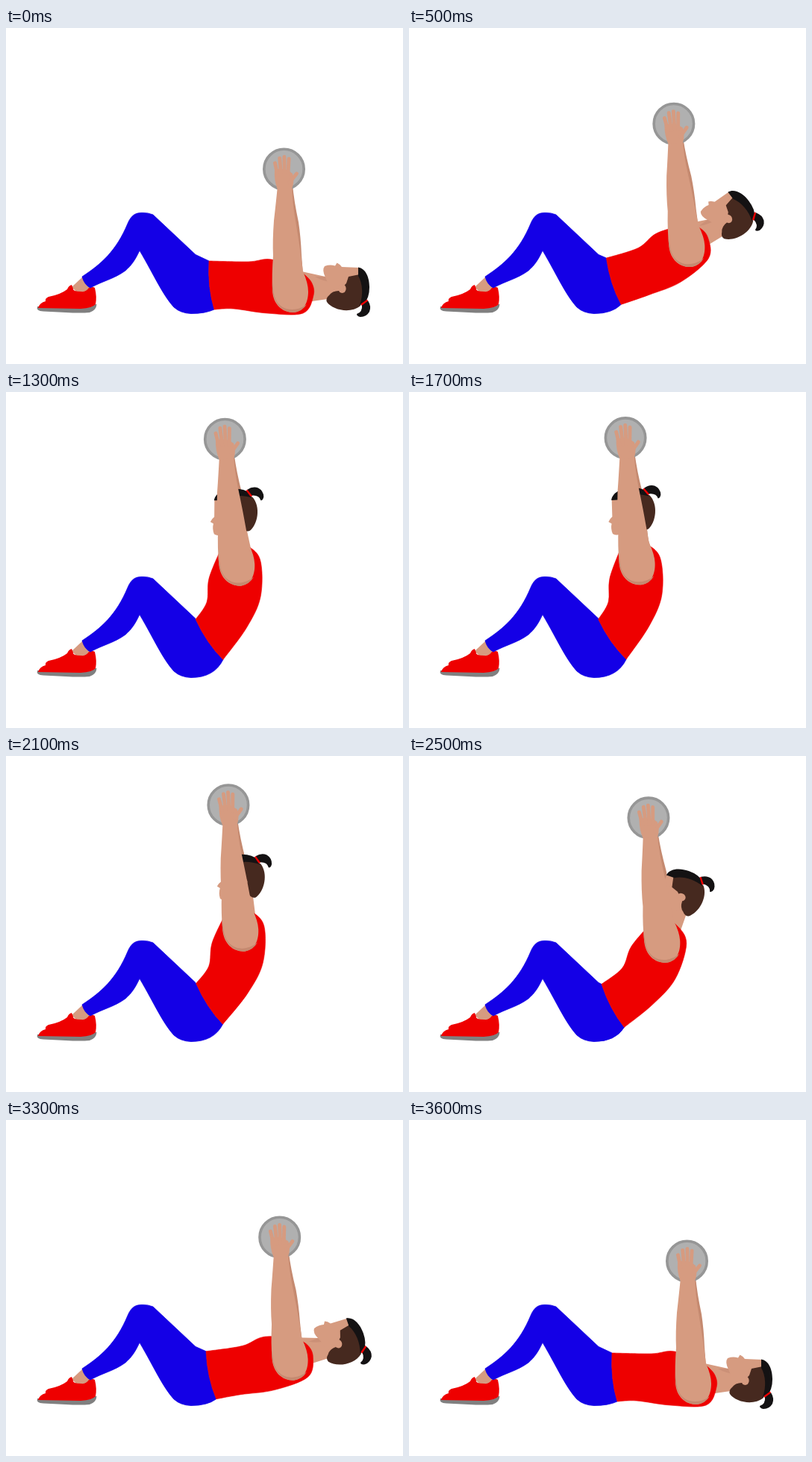
An HTML page with a canvas that plays this animation: 532 by 450 pixels, repeating every 3700 ms.

```html
<!DOCTYPE html>
<html lang="en">
<head>
<meta charset="utf-8">
<title>Weighted sit-up</title>
<style>
  html, body { margin: 0; width: 100%; height: 100%; overflow: hidden; background: #fff; }
  canvas { display: block; }
</style>
</head>
<body>
<canvas id="stage" width="532" height="450"></canvas>
<script>
const ctx = document.getElementById('stage').getContext('2d');
const LOOP = 3700, STEP = 100, TOP = 1700, FULL = 76;
const SKIN = '#d69b80', SHADE = '#c58a70', JAW = '#cb9077', RED = '#ee0000', BLUE = '#1400e6';
const HAIR = '#46291f', BLACK = '#141213';

// Joints of the lying pose; everything else turns around them
const HIP = [268, 340], NECK_ROOT = [268, 344], WAIST = [275.5, 344.5];
const SHOULDER = [382, 355], EAR = [451, 349], REACH = [-9.5, -166];

const shapes = {
  leg: 'M225 374C209 356 199 332 179 298C173 311 168 318 160 325C145 336 129 339 113 348' +
       'Q105 344 102 333C128 316 148 298 163 262C168 250 174 247.5 182 247.5Q190 247 197 250L254 303.5',
  ankle: 'M103 333L88 347L98 357L114 354L114 347Z',
  sole: 'M42 373Q40 379 50 379.5L80 381Q100 382 112 381Q121 378 121.5 370L112 370Z',
  shoe: 'M88 344Q84 345 82 350Q73 357 57 360Q52 362 53 366Q45 368 43 375L100 376Q116 375 120 370' +
        'Q122 360 119 348Q117 346 111 348Q107 354 101 353Q89 353 90 349Z',
  farArm: 'M370 208L384 210Q386 232 392 260Q395 280 396 304L398 330L376 330Z',
  arm: 'M364 211Q362 232 359 258Q357 285 358 305Q356 330 357 352C358 370 370 381 385 381' +
       'C398 380 405 369 405 353Q405 342 398 326Q396 310 392 283L387 252Q384 235 383 210Z',
  armShade: 'M357 340C355 367 370 381 385 381Q397 380 403 370C388 382 361 380 358.5 352Z',
  palm: 'M360 190Q359 204 363.5 215L383 215Q387 207 384 195Q373 186 360 190Z',
  face: 'M474 321L450 320Q447 316 443.5 314.5L441 318.5Q434 316.5 427 319Q423 324 428 334' +
        'Q434 345 431 362L455 371L476 345Z',
  jawShade: 'M429 333L414 333Q424 339 436 340Z',
  hair: 'M474 330L459 333L456 342L446 352Q437 352 433 358Q428 362 430 367' +
        'C438 378 462 383 475 372L480 350Z',
  cap: 'M472 320.5C482 322 487 334 487 347Q487 361 480 369L474 371C479 358 478 342 472 332Z',
  tail: 'M477 370L485 365Q490 373 487 380Q483 387 475 387Q470 386 470 383Q478 381 477 370Z',
  tie: 'M475.5 369.5L484 363.5L485 365.5L476.5 372Z'
};
for (const key in shapes) shapes[key] = new Path2D(shapes[key]);

const rad = deg => deg * Math.PI / 180;
const add = (a, b) => [a[0] + b[0], a[1] + b[1]];
const sub = (a, b) => [a[0] - b[0], a[1] - b[1]];

// Turn a point counter-clockwise around a centre
function spin(point, centre, deg) {
  const [x, y] = sub(point, centre), c = Math.cos(rad(deg)), s = Math.sin(rad(deg));
  return add(centre, [x * c + y * s, y * c - x * s]);
}

// Steady speed that levels off at a limit; a larger n gives a sharper bend
const level = (v, limit, n) => v / Math.pow(1 + Math.pow(v / limit, n), 1 / n);

function liftAt(t) {
  return t < TOP ? level(0.062 * t, 79, 14) : level(0.0538 * Math.max(0, 3600 - t), 79, 8);
}

function poseAt(lift) {
  const k = lift / FULL;
  const bulge = 14 * Math.sin(Math.PI / 2 * Math.min(1, k));
  // The spine bows backwards between hip and shoulders
  const chest = (x, y) => {
    const u = Math.min(1, (x - HIP[0]) / 130);
    return spin([x, y + bulge * Math.sin(Math.PI * u)], HIP, lift);
  };
  const waist = (x, y) => add(spin([x, y], WAIST, 0.37 * lift), [-3 * k, -13 * k]);
  const shoulder = spin(SHOULDER, HIP, lift);
  const armTurn = 2.5 * k + 2.2 * Math.sin(Math.PI * k);
  const stretch = 1 + 0.027 * k * k;
  return {
    chest, waist, shoulder, armTurn, stretch,
    plate: add(shoulder, spin([REACH[0], REACH[1] * stretch], [0, 0], armTurn)),
    ear: spin(EAR, NECK_ROOT, lift * (0.95 + 0.09 * k)),
    headTurn: 1.21 * lift
  };
}

function fill(path, color) {
  ctx.fillStyle = color;
  ctx.fill(path);
}

function outline(path, color, width) {
  ctx.strokeStyle = color;
  ctx.lineWidth = width;
  ctx.stroke(path);
}

// Smooth curve through points, starting from the current one
function curve(path, pts) {
  for (let i = 0; i < pts.length - 1; i++) {
    const b = pts[i], c = pts[i + 1];
    const a = pts[i - 1] || b, d = pts[i + 2] || c;
    path.bezierCurveTo(
      b[0] + (c[0] - a[0]) / 6, b[1] + (c[1] - a[1]) / 6,
      c[0] - (d[0] - b[0]) / 6, c[1] - (d[1] - b[1]) / 6, c[0], c[1]);
  }
}

function placed(at, from, deg, stretch, draw) {
  ctx.save();
  ctx.translate(...at);
  ctx.rotate(-rad(deg));
  ctx.scale(1, stretch);
  ctx.translate(-from[0], -from[1]);
  draw();
  ctx.restore();
}

const inArm = (p, draw) => placed(p.shoulder, SHOULDER, p.armTurn, p.stretch, draw);

function drawNeck(p) {
  const onHead = (x, y) => add(p.ear, spin([x, y], [0, 0], p.headTurn));
  const path = new Path2D();
  path.moveTo(...p.chest(396, 326));
  path.lineTo(...onHead(-23, -16));
  path.lineTo(...onHead(-8, 0));
  path.lineTo(...onHead(-20, 14));
  path.lineTo(...p.chest(410, 366));
  path.lineTo(...p.shoulder);
  fill(path, SKIN);
}

function drawHead() {
  fill(shapes.jawShade, JAW);
  fill(shapes.face, SKIN);
  fill(shapes.hair, HAIR);
  fill(shapes.cap, BLACK);
  fill(shapes.tail, BLACK);
  fill(shapes.tie, RED);
  const ear = new Path2D();
  ear.ellipse(450.5, 349, 5.2, 6, 0, 0, 7);
  fill(ear, SKIN);
}

function drawLegs(p) {
  fill(shapes.ankle, SKIN);
  fill(shapes.sole, '#808080');
  fill(shapes.shoe, RED);
  const path = new Path2D(shapes.leg), end = p.waist(279, 377);
  path.lineTo(...p.waist(272, 312));
  path.quadraticCurveTo(...p.waist(270, 347), ...end);
  path.quadraticCurveTo(end[0] - 12, 382.5, 248, 382.5);
  path.quadraticCurveTo(234, 382, 225, 374);
  fill(path, BLUE);
  outline(path, BLUE, 0.8);
}

function drawTorso(p) {
  const { chest, waist } = p, top = waist(272, 312);
  const path = new Path2D();
  path.moveTo(...top);
  curve(path, [top, chest(325, 313), chest(356, 310), chest(395, 326)]);
  curve(path, [
    chest(395, 326), chest(409, 340), chest(412, 358), chest(398, 382),
    chest(350, 382), chest(305, 376), waist(279, 377)
  ]);
  path.quadraticCurveTo(...waist(270, 347), ...top);
  fill(path, RED);
  outline(path, RED, 0.6);
}

function drawPlate([x, y]) {
  const disc = new Path2D();
  disc.arc(x, y, 26.7, 0, 7);
  fill(disc, '#b0b0b0');
  outline(disc, '#969696', 3.6);
}

function finger(x0, y0, x1, y1) {
  const path = new Path2D();
  path.moveTo(x0, y0);
  path.lineTo(x1, y1);
  outline(path, SKIN, 4.9);
}

function drawArm() {
  fill(shapes.arm, SKIN);
  fill(shapes.armShade, SHADE);
  fill(shapes.palm, SKIN);
  ctx.lineCap = 'round';
  for (let i = 0; i < 4; i++) {
    finger(364 + 4.6 * i, 197, 360.5 + 6.2 * i, 172.5 + 2.3 * (i - 1.9) ** 2);
  }
  finger(380, 207, 389.5, 195);
}

function render(t) {
  const p = poseAt(liftAt(t));
  ctx.fillStyle = '#fff';
  ctx.fillRect(0, 0, 532, 450);
  inArm(p, () => fill(shapes.farArm, SHADE));
  drawNeck(p);
  placed(p.ear, EAR, p.headTurn, 1, drawHead);
  drawLegs(p);
  drawTorso(p);
  drawPlate(p.plate);
  inArm(p, drawArm);
}

function tick() {
  const t = performance.now() % LOOP;
  render(Math.floor(t / STEP) * STEP);
  requestAnimationFrame(tick);
}
tick();
</script>
</body>
</html>
```
